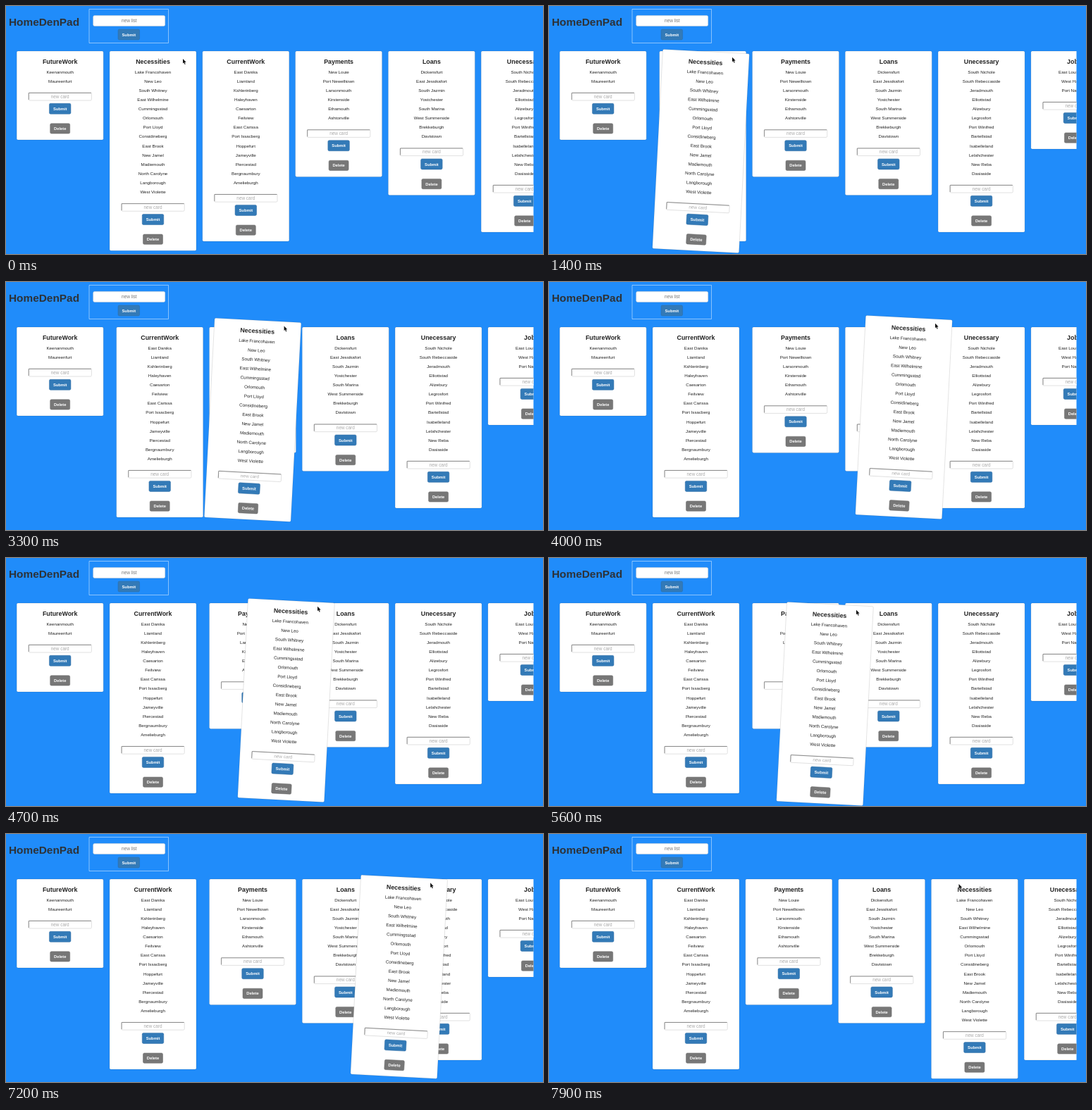
Write an HTML page with a canvas that moves like this. It is 762 px wide and 352 px high and loops after 8000 ms.

```html
<!DOCTYPE html>
<html lang="en">
<head>
<meta charset="utf-8">
<title>HomeDenPad</title>
<style>
html, body { margin: 0; width: 100%; height: 100%; overflow: hidden; background: #208cfa; }
canvas { display: block; width: 762px; height: 352px; }
</style>
</head>
<body>
<canvas id="stage"></canvas>
<script>
const W = 762, H = 352, LOOP = 8000;
const canvas = document.getElementById('stage');
const ctx = canvas.getContext('2d');
const dpr = window.devicePixelRatio || 1;
canvas.width = W * dpr;
canvas.height = H * dpr;

const FONT = '"Liberation Sans", Arial, sans-serif';
const CARD_W = 123, TOP = 64, LEFT = 15.2, PITCH = 131.8, GAP = 9.7, ROW = 13.1;
const PICK = 1000, SWAP = 3700, SETTLE = 7500, DROP = 7900;
const TILT = 3 * Math.PI / 180;

const list = (title, items) => ({ title, items: items.split(',') });
const future = list('FutureWork', 'Keenanmouth,Maureenfurt');
const needs = list('Necessities', 'Lake Francohaven,New Leo,South Whitney,East Wilhelmine,Cummingsstad,Orlomouth,Port Lloyd,Considineberg,East Brook,New Jamel,Madiemouth,North Carolyne,Langborough,West Violette');
const others = [
  future,
  list('CurrentWork', 'East Danika,Liamland,Kshlerinberg,Haleyhaven,Caesarton,Feilview,East Carissa,Port Issacberg,Hoppefurt,Jameyville,Piercestad,Bergnaumbury,Amelieburgh'),
  list('Payments', 'New Louie,Port Newelltown,Larsonmouth,Kirstenside,Ethamouth,Ashtonville'),
  list('Loans', 'Dickensfurt,East Jessikafort,South Jazmin,Yostchester,South Marina,West Summerside,Brekkeburgh,Davistown'),
  list('Unecessary', 'South Nichole,South Rebeccaside,Jeradmouth,Elliottstad,Alizebury,Legrosfort,Port Winifred,Bartellstad,Isabelleland,Lelahchester,New Reba,Dasiaside'),
  list('Jobs', 'East Louisburgh,West Haleigh,Port Nadiaby')
];

// [time, x, y] of the lifted card's centre
const cardPath = [
  [1000, 211, 205.5], [1400, 215.5, 206], [1700, 227, 192.5], [2500, 314, 199],
  [2900, 236, 198], [3500, 390, 195], [4000, 503.5, 192], [4400, 452, 201],
  [5000, 343, 203], [5600, 391.5, 207], [6000, 250, 206], [6300, 297, 204],
  [6500, 454.5, 200], [6900, 545, 190], [7300, 560, 205], [7700, 535, 205]
];
const pointerPath = [
  [300, 251, 75], [500, 236, 60], [700, 250, 73], [900, 255, 72]
];

function along(path, t) {
  if (t <= path[0][0]) return path[0].slice(1);
  for (let i = 1; i < path.length; i++) {
    const [t0, x0, y0] = path[i - 1], [t1, x1, y1] = path[i];
    if (t <= t1) {
      const u = (t - t0) / (t1 - t0), k = u * u * (3 - 2 * u);
      return [x0 + (x1 - x0) * k, y0 + (y1 - y0) * k];
    }
  }
  return path[path.length - 1].slice(1);
}

function text(s, x, y, size, color, weight = 'normal', align = 'center') {
  ctx.font = `${weight} ${size}px ${FONT}`;
  ctx.textAlign = align;
  ctx.fillStyle = color;
  ctx.fillText(s, x, y);
}

function box(x, y, w, h, r, fill, stroke, line = 0.5) {
  ctx.beginPath();
  ctx.roundRect(x, y, w, h, r);
  if (fill) { ctx.fillStyle = fill; ctx.fill(); }
  if (stroke) { ctx.strokeStyle = stroke; ctx.lineWidth = line; ctx.stroke(); }
}

function button(label, cx, y, w, h, fill, edge) {
  box(cx - w / 2, y, w, h, 1.8, fill, edge);
  text(label, cx, y + h / 2 + 2.1, 5.8, '#fff', 'bold');
}

const submit = (cx, y) => button('Submit', cx, y, 30.5, 15, '#337ab7', '#2e6da4');

function field(cx, y) {
  const x = cx - 44.7, w = 89.4, h = 11;
  box(x, y, w, h, 1.5, '#fff', '#d4d4d4', 0.7);
  ctx.beginPath();
  ctx.moveTo(x + 0.3, y + h - 1);
  ctx.lineTo(x + 0.3, y + 0.4);
  ctx.lineTo(x + w - 0.5, y + 0.4);
  ctx.strokeStyle = '#777';
  ctx.lineWidth = 0.8;
  ctx.stroke();
  text('new card', cx, y + 7.6, 6.4, '#aaa');
}

const cardHeight = c => 99.8 + ROW * c.items.length;

function card(c, x, y) {
  const cx = x + CARD_W / 2;
  box(x, y, CARD_W, cardHeight(c), 1.8, '#fff', 'rgba(0,0,0,0.22)');
  text(c.title, cx, y + 18.1, 8.85, '#222', 'bold');
  c.items.forEach((s, i) => text(s, cx, y + 31.7 + i * ROW, 6.2, '#222'));
  const base = y + 32.8 + ROW * c.items.length;
  field(cx, base);
  submit(cx, base + 15.3);
  button('Delete', cx, base + 43.8, 28, 14.3, '#777', '#6a6a6a');
}

function header() {
  text('HomeDenPad', 4, 27.7, 15.4, '#2d3238', 'bold', 'left');
  box(118, 4.5, 112.5, 48, 0, null, 'rgba(255,255,255,0.6)', 0.8);
  box(123.7, 13.6, 102, 14.8, 2, '#fff', '#ccc');
  text('new list', 174.8, 23.2, 6.5, '#777');
  submit(174.3, 33);
}

function pointer(x, y) {
  const pts = [[0, 0], [0, 6.6], [1.5, 5.3], [2.6, 8], [3.7, 7.5], [2.6, 5], [4.6, 4.8]];
  ctx.beginPath();
  pts.forEach(([px, py]) => ctx.lineTo(x + px, y + py));
  ctx.closePath();
  ctx.strokeStyle = 'rgba(255,255,255,0.7)';
  ctx.lineWidth = 0.8;
  ctx.stroke();
  ctx.fillStyle = '#111';
  ctx.fill();
}

function draw(t) {
  ctx.setTransform(dpr, 0, 0, dpr, 0, 0);
  ctx.fillStyle = '#208cfa';
  ctx.fillRect(0, 0, W, H);
  header();

  const lifted = t >= PICK && t < DROP;
  const slot = t < SWAP ? 1 : t < SETTLE ? 2 : 4;
  const room = lifted ? GAP : PITCH;

  ctx.save();
  ctx.beginPath();
  ctx.rect(0, 0, 748.5, H);
  ctx.clip();
  others.forEach((c, i) => card(c, LEFT + i * PITCH + (i >= slot ? room : 0), TOP));
  let tip;
  if (lifted) {
    const [x, y] = along(cardPath, t);
    ctx.save();
    ctx.translate(x, y);
    ctx.rotate(TILT);
    card(needs, -CARD_W / 2, -cardHeight(needs) / 2);
    ctx.restore();
    tip = [x + 44.5, y - 133.3];
  } else {
    card(needs, LEFT + slot * PITCH, TOP);
    tip = t < PICK ? along(pointerPath, t) : [581.5, 71];
  }
  ctx.restore();
  pointer(...tip);
}

function tick() {
  const t = performance.now() % LOOP;
  draw(Math.floor(t / 100) * 100);
  requestAnimationFrame(tick);
}
tick();
</script>
</body>
</html>
```
